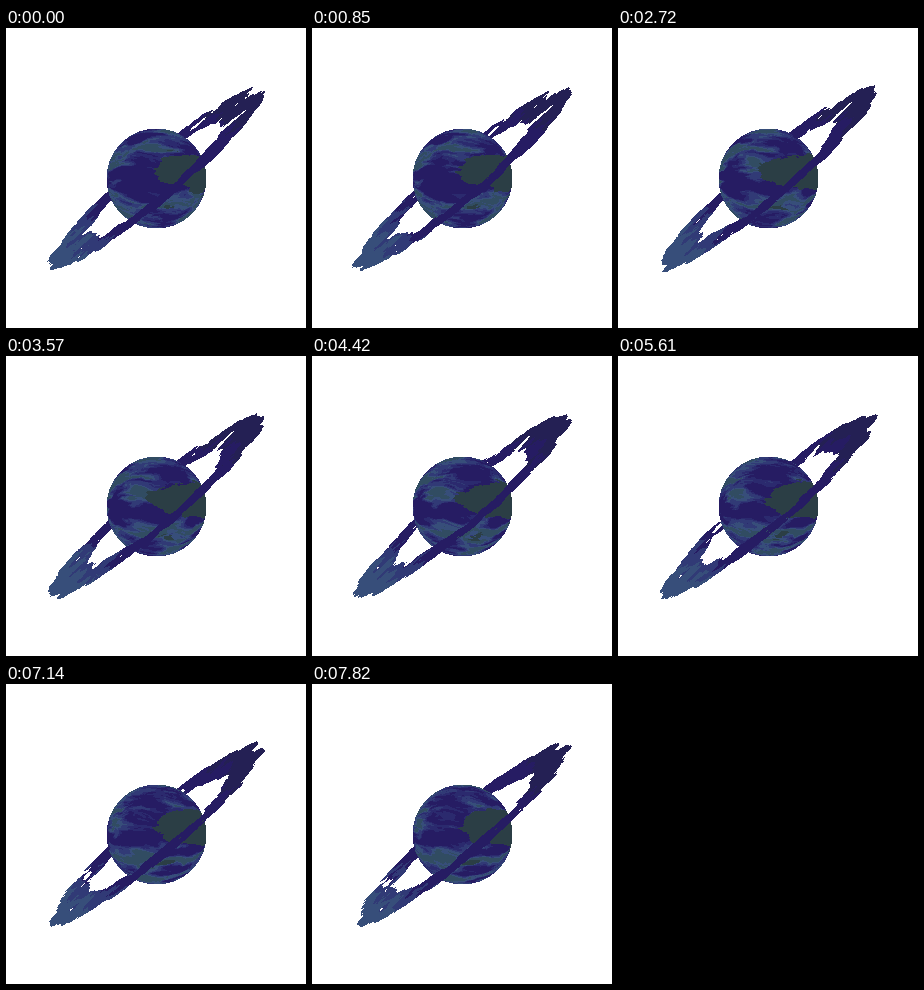
These frames come from a looping animation (300x300 px, 7990 ms). An HTML page with a canvas:

```html
<!DOCTYPE html>
<html lang="en">
<head>
<meta charset="utf-8">
<title>Ringed planet</title>
<style>
html, body { margin: 0; width: 100%; height: 100%; overflow: hidden; background: #fff; }
canvas { display: block; width: 100vw; height: 100vh; image-rendering: pixelated; }
</style>
</head>
<body>
<canvas id="stage" width="300" height="300"></canvas>
<script>
const SIZE = 300, STEP = 170, STEPS = 47;
const RADIUS = 50, TILT = 0.7, SQUASH = 6, SPIN = 0.2;
const NAVY = [38, 28, 99], INDIGO = [43, 42, 110], BLUE = [49, 58, 118];
const STEEL = [55, 78, 122], TEAL = [49, 76, 98], SLATE = [43, 62, 69], DUSK = [36, 32, 84];
// Denser parts of the ring: angle in the ring's own frame, added density
const CLUMPS = [[0.1, 0.07], [1.25, 0.07], [3.25, 0.05], [4.45, 0.06]];

const ctx = document.getElementById('stage').getContext('2d');
const image = ctx.createImageData(SIZE, SIZE);

function smooth(a, b, v) {
  const t = Math.min(1, Math.max(0, (v - a) / (b - a)));
  return t * t * (3 - 2 * t);
}

function hash(x, y, seed) {
  let h = Math.imul(x, 374761393) ^ Math.imul(y, 668265263) ^ Math.imul(seed, 974634777);
  h = Math.imul(h ^ (h >>> 13), 1274126177);
  h = Math.imul(h ^ (h >>> 15), 2246822519);
  return ((h ^ (h >>> 16)) >>> 0) / 4294967296;
}

function noise(x, y, seed) {
  const ix = Math.floor(x), iy = Math.floor(y);
  const u = smooth(0, 1, x - ix), v = smooth(0, 1, y - iy);
  const top = hash(ix, iy, seed) * (1 - u) + hash(ix + 1, iy, seed) * u;
  const low = hash(ix, iy + 1, seed) * (1 - u) + hash(ix + 1, iy + 1, seed) * u;
  return top * (1 - v) + low * v;
}

function fbm(x, y, seed, octaves = 4) {
  let sum = 0, amp = 0.5;
  for (let i = 0; i < octaves; i++) {
    sum += amp * noise(x, y, seed + i);
    x *= 2; y *= 2; amp /= 2;
  }
  return sum;
}

const blob = (x, y, cx, cy, rx, ry) =>
  Math.exp(-(((x - cx) / rx) ** 2) - ((y - cy) / ry) ** 2);

function planetColor(px, py, time) {
  const x = px / RADIUS, y = py / RADIUS, r = Math.hypot(x, y);
  if (r >= 1) return null;
  const bulge = 1 / (1 + 0.8 * Math.sqrt(1 - r * r));
  const sx = x * bulge, sy = y * bulge;
  const warp = fbm(sx * 4, sy * 6, 31, 3);
  const flow = fbm(sx * 2.6 + warp + time * 0.28, sy * 10 + warp * 1.6, 11) - 0.47;

  const land = blob(x, y, 0.5, -0.16, 0.72, 0.4)
    + 0.5 * blob(x, y, 0.25, 0.62, 0.45, 0.16)
    + 0.5 * blob(x, y, 0.95, 0, 0.25, 0.4);
  if (land + flow * 0.8 > 0.57) return SLATE;

  const band = 0.1 * blob(x, y, -0.45, -0.42, 0.7, 0.28)
    + 0.12 * blob(x, y, 0, -0.9, 0.6, 0.15)
    + 0.18 * blob(x, y, -0.2, 0.65, 1.1, 0.34)
    - 0.2 * blob(x, y, -0.35, 0.08, 0.9, 0.17);
  const tone = band + flow * 1.05 + 0.12 * smooth(0.8, 1, r);
  if (tone > 0.27) return TEAL;
  if (tone > 0.19) return STEEL;
  if (tone > 0.09) return BLUE;
  return tone > 0.02 ? INDIGO : NAVY;
}

function ringColor(px, py, time) {
  const c = Math.cos(TILT), s = Math.sin(TILT);
  const along = px * c - py * s, across = px * s + py * c;
  if (across < 0 && Math.hypot(px, py) < RADIUS) return null;
  const u = along / SIZE, v = across * SQUASH / SIZE;
  const d = Math.hypot(u, v) * 1.015;
  if (d > 0.55 || d < 0.21) return null;

  const angle = Math.atan2(v, u) + time * SPIN, reach = Math.hypot(u, v);
  let grain = 0.06 + 0.82 * fbm(
    (reach * Math.cos(angle) + 0.5) * 15, (reach * Math.sin(angle) + 0.5) * 15, 71);
  for (const [center, density] of CLUMPS) {
    grain += density * Math.exp(6 * (Math.cos(angle - center) - 1));
  }
  const fade = smooth(0.214, 0.357, d) * smooth(d - 0.143, d, 0.4);
  if (fade * grain < 0.285) return null;

  const light = -along / 150 + (grain - 0.47) * 0.6;
  if (light > 0.68) return STEEL;
  if (light > 0.5) return BLUE;
  return light < -0.55 ? DUSK : NAVY;
}

function draw(step) {
  const time = step * STEP / 1000;
  for (let y = 0, i = 0; y < SIZE; y++) {
    for (let x = 0; x < SIZE; x++, i += 4) {
      const px = x - 150, py = y - 150;
      const color = ringColor(px, py, time) || planetColor(px, py, time) || [255, 255, 255];
      image.data.set(color, i);
      image.data[i + 3] = 255;
    }
  }
  ctx.putImageData(image, 0, 0);
}

let shown = 0;
const start = performance.now();
function tick() {
  const step = Math.floor(Math.max(0, performance.now() - start) / STEP) % STEPS;
  if (step !== shown) draw(shown = step);
  requestAnimationFrame(tick);
}
draw(0);
requestAnimationFrame(tick);
</script>
</body>
</html>
```
